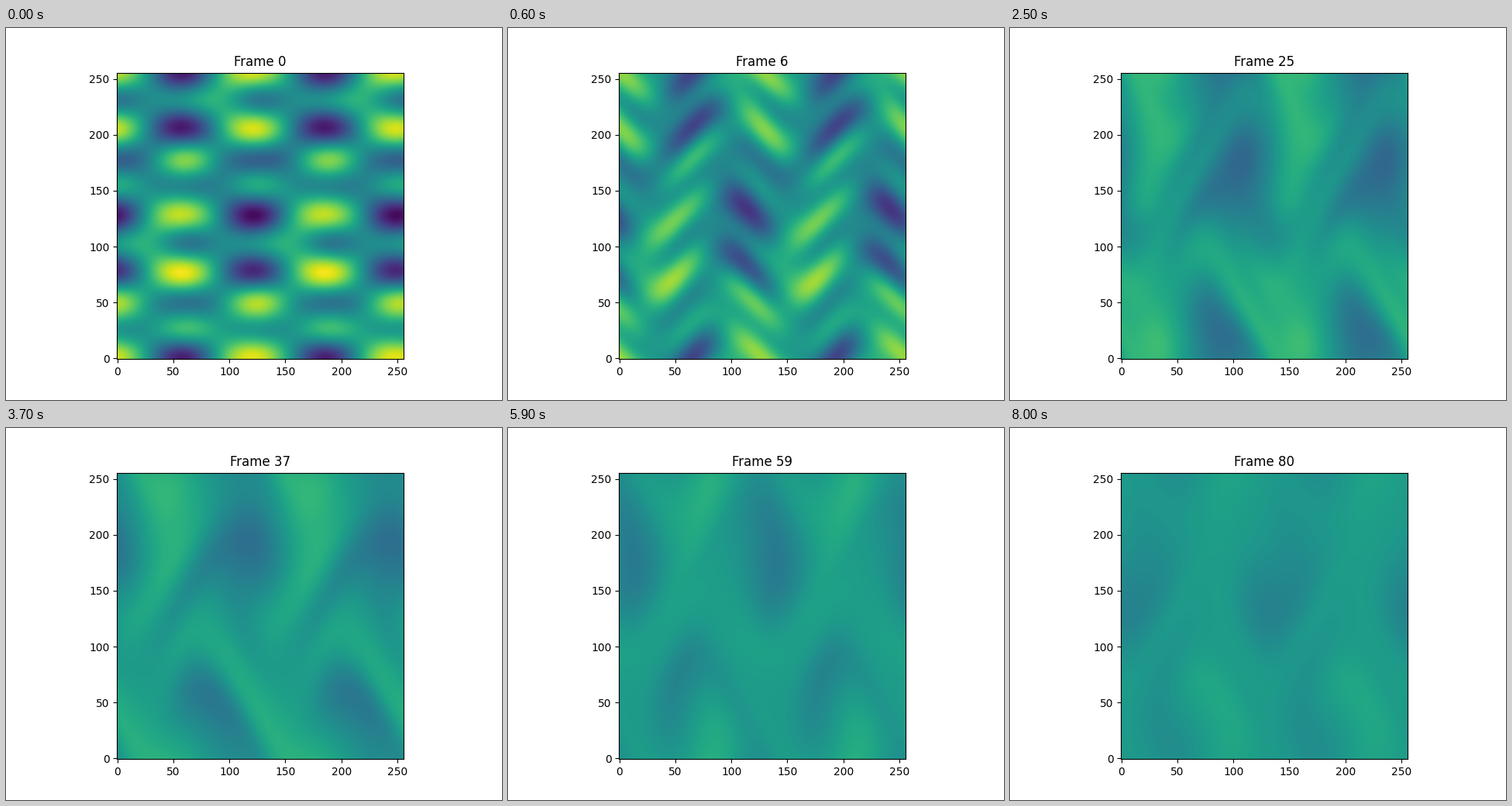
A matplotlib script for the animation above (8.1 s loop, 640 px wide and 480 px high).

```python
import numpy as np
import matplotlib.pyplot as plt
from matplotlib.animation import FuncAnimation

SIZE = 256
FRAMES = 81
STEPS = 4           # substeps per frame
DIFFUSION = 0.0028  # per frame, on a domain 2*pi wide
SPEED_X = 0.045     # radians per frame
SPEED_Y = 0.080

angle = 2 * np.pi * np.arange(SIZE) / SIZE
x = angle[np.newaxis, :] + 0.1
y = angle[:, np.newaxis]

# Two crossed shear flows, which together form rows of stirring cells
flow_x = -SPEED_X * np.sin(y - 0.75)
flow_y = -SPEED_Y * np.sin(2 * x)


def initial_dye():
    bands = (0.247 * np.cos(5 * y)
             + 0.228 * np.cos(y + 0.34)
             + 0.046 * np.cos(3 * y - 2.2))
    skew = -0.08 * np.sin(2 * x) * np.cos(y + 0.59)
    ripple = (0.02 + 0.05 * np.cos(4 * x)) * np.cos(2 * y - 2.2)
    drift = 0.04 * np.cos(y - 0.9)
    return 0.53 + bands * np.cos(2 * x) + skew + ripple + drift


def shear_operator(flow, axis, dt):
    """Fourier factor that shifts by flow * dt along an axis and diffuses."""
    k = np.arange(SIZE // 2 + 1)
    k = np.expand_dims(k, 1 - axis)
    return np.exp(-1j * k * flow * dt - DIFFUSION * k**2 * dt)


def apply_shear(dye, operator, axis):
    return np.fft.irfft(np.fft.rfft(dye, axis=axis) * operator, n=SIZE, axis=axis)


def stir():
    """The dye at every frame."""
    dt = 1 / STEPS
    half_x = shear_operator(flow_x, 1, dt / 2)
    full_y = shear_operator(flow_y, 0, dt)
    dye = initial_dye()
    history = [dye]
    for _ in range(FRAMES - 1):
        for _ in range(STEPS):
            dye = apply_shear(dye, half_x, 1)
            dye = apply_shear(dye, full_y, 0)
            dye = apply_shear(dye, half_x, 1)
        history.append(dye)
    return history


history = stir()

fig, ax = plt.subplots(figsize=(6.4, 4.8), dpi=100)
image = ax.imshow(history[0], cmap="viridis", origin="lower", vmin=0, vmax=1)
title = ax.set_title("Frame 0")


def update(n):
    image.set_data(history[n])
    title.set_text(f"Frame {n}")
    return image, title


anim = FuncAnimation(fig, update, frames=FRAMES, interval=100, repeat=True,
                     repeat_delay=0, blit=False)
plt.show()
```
